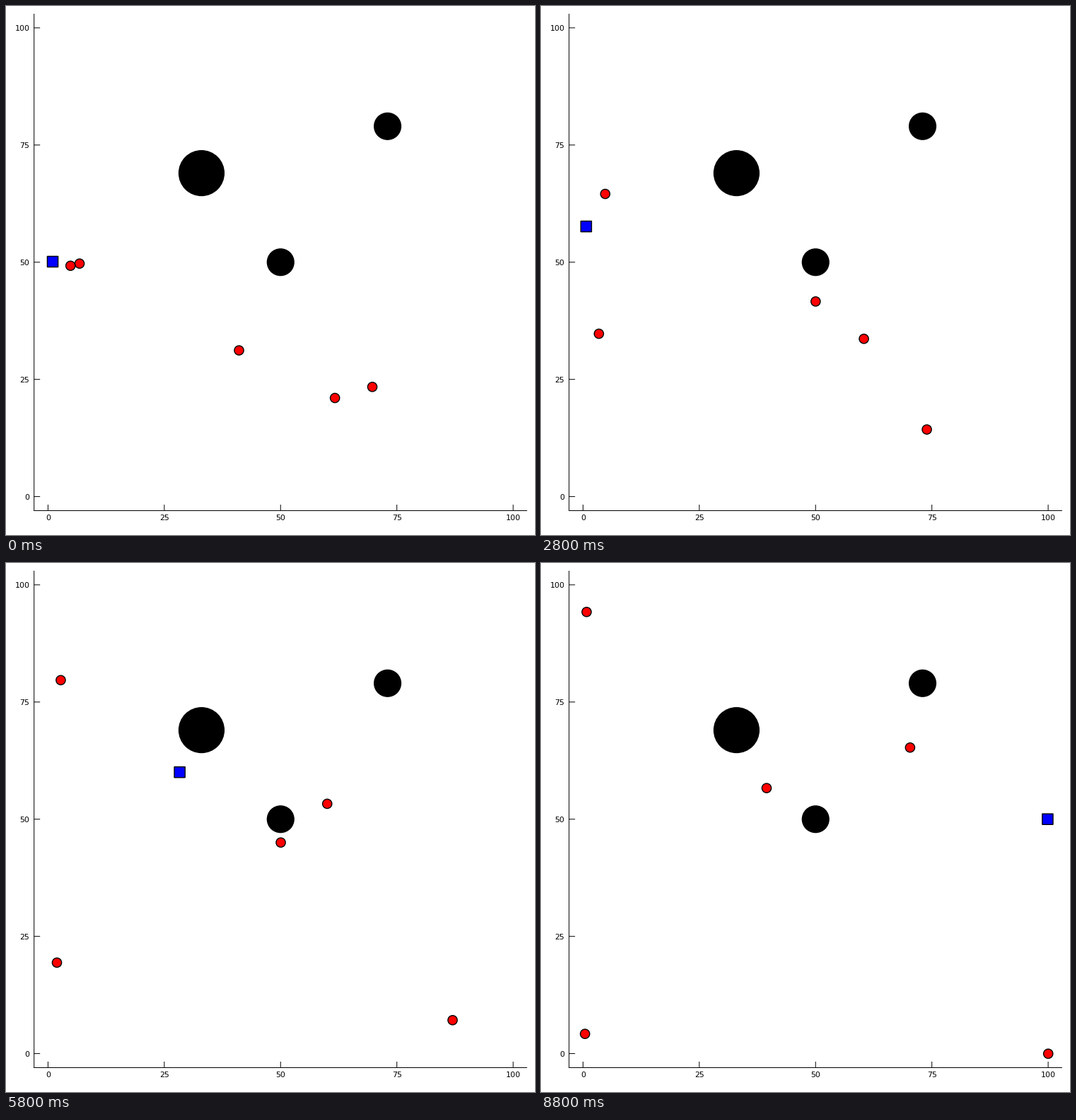
A matplotlib script for the animation above (9000 ms loop, 748 by 749 pixels).

```python
import numpy as np
import matplotlib.pyplot as plt
from matplotlib.animation import FuncAnimation
from matplotlib.patches import Circle, Rectangle

W, H, DPI = 748, 749, 128
FRAMES, INTERVAL = 45, 200
PX = 72 / DPI  # points per pixel
LAST = FRAMES - 1

plt.rcParams["font.family"] = "DejaVu Sans"
fig = plt.figure(figsize=(W / DPI, H / DPI), dpi=DPI, facecolor="white")
ax = fig.add_axes([0, 0, 1, 1])
ax.set_xlim(0, W)
ax.set_ylim(H, 0)
ax.axis("off")


def to_px(x, y):
    return 59.4 + 6.577 * x, 694.6 - 6.637 * y


def line(x0, y0, x1, y1):
    ax.plot([x0, x1], [y0, y1], color="black", lw=PX,
            solid_capstyle="butt", snap=False)


def label(x, y, value, align):
    ax.text(x, y, str(value), ha=align, va="baseline", fontsize=11 * PX)


# Axes with inward ticks
left, bottom = to_px(-3, -3)
right, top = to_px(103, 103)
line(left, top, left, bottom + 0.5)
line(left - 0.5, bottom, right, bottom)
for v in range(0, 101, 25):
    x, y = to_px(v, v)
    line(x, bottom - 8.5, x, bottom)
    line(left, y, left + 8.5, y)
    label(x, 728.3, v, "center")
    label(33.4, y + 4.2, v, "right")

# Obstacles
for x, y, r in [(33, 69, 5), (50, 50, 3), (73, 79, 3)]:
    ax.add_patch(Circle(to_px(x, y), r * 6.52, fc="black", ec="none"))

# Balls run straight; the last value is the share of the way done at HALF
HALF = 20
BALLS = [
    ((104, 364.7), (64.5, 69.3), 0.477),
    ((91.2, 367.8), (62.2, 666.7), 0.460),
    ((329.5, 487.6), (521.9, 261.3), 0.437),
    ((518, 539.3), (319, 318.7), 0.441),
    ((465.1, 555), (717.2, 694.8), 0.456),
]

# Robot waypoints: frame, x, y
ROUTE = np.array([(0, 66, 362), (9, 67, 319), (17, 62, 308), (20, 118, 272.3),
                  (29, 245.6, 296.2), (35, 381.8, 302.2), (LAST, 716.4, 362.7)])

SIDE = 15.2
style = dict(ec="black", lw=1.4 * PX, zorder=3)
robot = ax.add_patch(Rectangle((0, 0), SIDE, SIDE, fc="blue", snap=False,
                               **style))
balls = [ax.add_patch(Circle((0, 0), 6.6, fc="red", **style)) for _ in BALLS]


def update(i):
    for ball, (start, end, share) in zip(balls, BALLS):
        t = np.interp(i, [0, HALF, LAST], [0, share, 1])
        ball.center = (1 - t) * np.array(start) + t * np.array(end)
    x, y = (np.interp(i, ROUTE[:, 0], ROUTE[:, k]) for k in (1, 2))
    robot.set_xy((x - SIDE / 2, y - SIDE / 2))
    return [robot, *balls]


anim = FuncAnimation(fig, update, frames=FRAMES, interval=INTERVAL,
                     repeat=True, repeat_delay=0)
plt.show()
```
